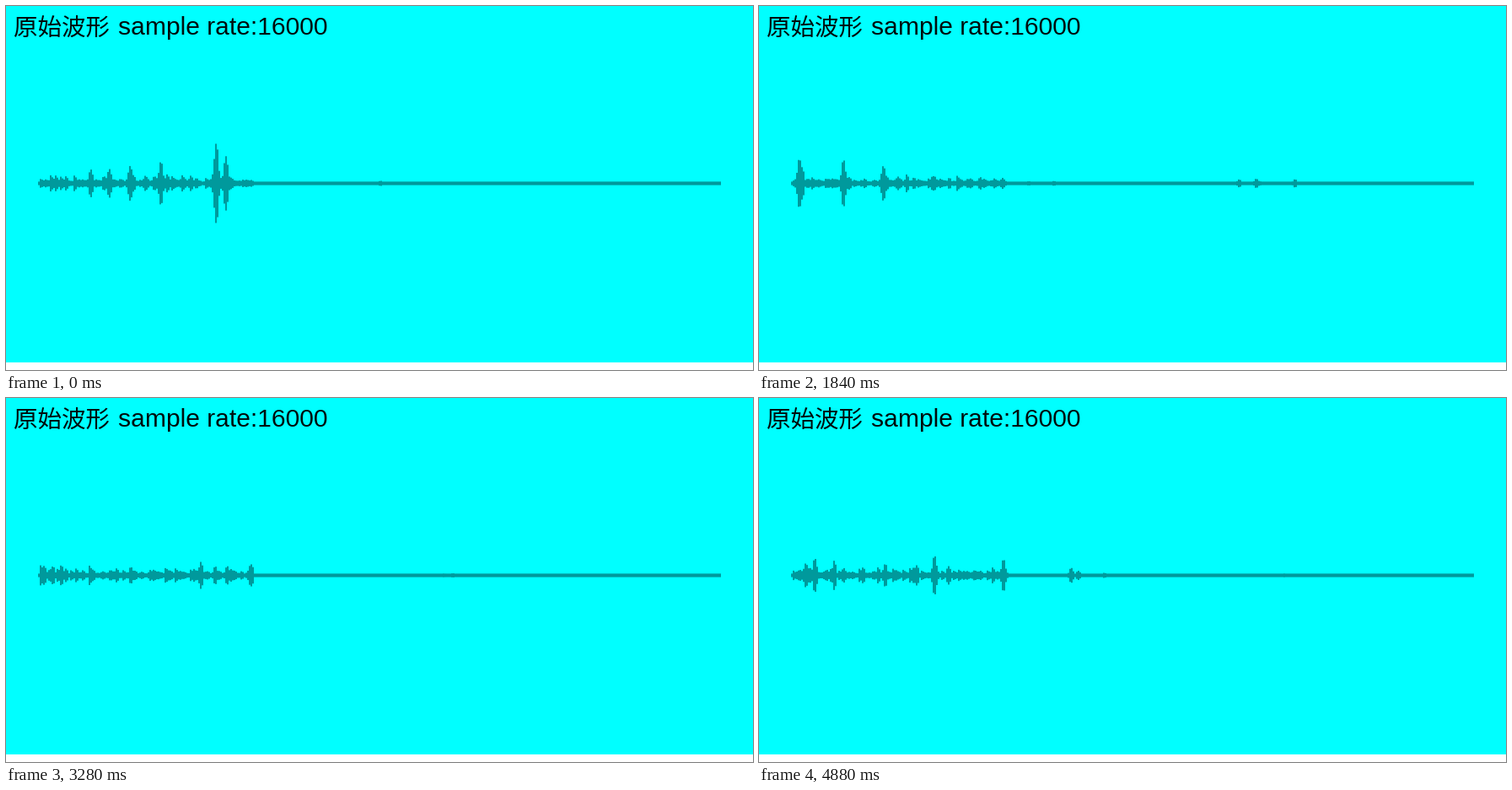
These frames come from a looping animation (886 by 432 pixels, 4.96 s). A matplotlib script:

```python
import numpy as np
import matplotlib.pyplot as plt
from matplotlib.animation import FuncAnimation
from matplotlib.patches import Rectangle

W, H, DPI = 886, 432, 64
FRAMES, STEP_MS = 62, 80
LEFT, RIGHT, BAR = 38, 848, 2
MID, BASE, LIMIT = 210.5, 2.1, 47
VOICED = 294
PARTIALS = [47, 55, 66, 80, 87, 101, 123, 148, 165, 184, 207, 226, 248, 262, 290]

edges = np.arange(LEFT, RIGHT + 1, BAR)
centers = edges[:-1] + BAR / 2


def loudness(step):
    """The voice swells three times per loop."""
    return 1.1 + 0.35 * np.cos(2 * np.pi * 3 * (step - 10) / FRAMES)


def peaks(loud, rng):
    """Partials of the voice, then a few faint bumps further right."""
    for x in PARTIALS:
        yield x + rng.normal(0, 0.8), loud * (3 + rng.exponential(9))
    for _ in range(rng.poisson(2.5 * loud ** 2)):
        yield rng.uniform(320, 640), 2 + loud * rng.exponential(2)


def ripple(rng):
    """Low noise between the partials, silent to their right."""
    noise = rng.exponential(2, centers.size)
    noise = np.maximum(noise, 0.7 * np.roll(noise, 1))
    lift = 1 + np.exp(-((centers - 52) / 14) ** 2)
    return np.where((centers > 40) & (centers < VOICED), noise * lift, 0)


def spectrum(step):
    rng = np.random.default_rng(100 + step)
    heights = BASE + ripple(rng)
    for x, h in peaks(loudness(step), rng):
        gap = np.maximum(np.abs(centers - x) - 0.8, 0)
        heights = np.maximum(heights, h / (1 + (gap / 1.9) ** 2))
    return np.clip(heights, BASE, LIMIT)


def label(x, y, text, font, px):
    ax.text(x, y, text, family=font, size=px * 72 / DPI,
            color="#000c0c", va="baseline", ha="left")


fig = plt.figure(figsize=(W / DPI, H / DPI), dpi=DPI, facecolor="white")
ax = fig.add_axes([0, 0, 1, 1])
ax.axis("off")
ax.add_patch(Rectangle((0, 0), W, 423, color="#00ffff", lw=0))
label(9.5, 35, "原始波形", "Noto Sans CJK JP", 28.5)
label(133.5, 34, "sample rate:16000", "Liberation Sans", 30)

first = spectrum(0)
wave = ax.stairs(MID + first, edges, baseline=MID - first, fill=True,
                 color="#00999c", snap=False, zorder=3)
ax.set_xlim(0, W)
ax.set_ylim(H, 0)


def update(step):
    h = spectrum(step)
    wave.set_data(values=MID + h, baseline=MID - h)
    return [wave]


anim = FuncAnimation(fig, update, frames=FRAMES, interval=STEP_MS,
                     repeat=True, repeat_delay=0)
plt.show()
```
